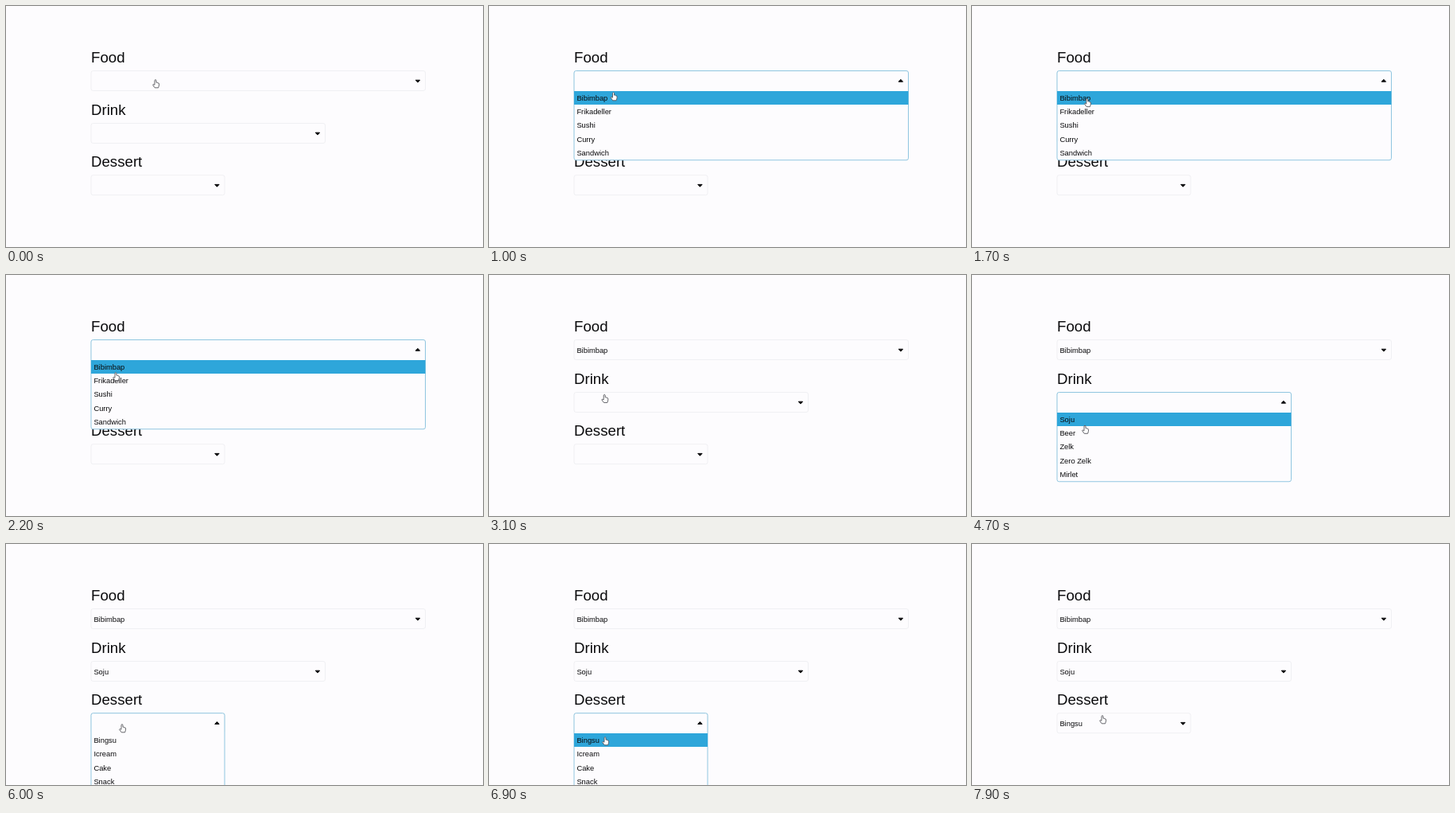
Animation of 600 by 303 pixels, one loop 8 s. Source, as an HTML page with a canvas:

```html
<!DOCTYPE html>
<html lang="en">
<head>
<meta charset="utf-8">
<title>Menu selects</title>
<style>
  html, body { margin: 0; width: 100%; height: 100%; overflow: hidden; background: #fdfcfe; }
  canvas { display: block; }
</style>
</head>
<body>
<canvas id="stage" width="600" height="303"></canvas>
<script>
const ctx = document.getElementById('stage').getContext('2d');
const LOOP = 8000, STEP = 100;
const LEFT = 107, BOX_H = 25, ROW_H = 17.45;
const BG = '#fdfcfe', INK = '#0a0a0c', BLUE = '#2ea6da', FOCUS = '#90c6e0', FAINT = '#f0f0f3';
const FONT = '"Liberation Sans", Arial, sans-serif';

// open / hover / close are times in ms
const selects = [
  { title: 'Food', y: 81.5, width: 420.5, open: 600, hover: 800, close: 2600,
    items: ['Bibimbap', 'Frikadeller', 'Sushi', 'Curry', 'Sandwich'] },
  { title: 'Drink', y: 147.5, width: 294.5, open: 3800, hover: 4000, close: 5000,
    items: ['Soju', 'Beer', 'Zelk', 'Zero Zelk', 'Mirlet'] },
  { title: 'Dessert', y: 212.7, width: 168, open: 6000, hover: 6300, close: 7400,
    items: ['Bingsu', 'Icream', 'Cake', 'Snack', 'Fruit'] }
];

// fingertip position: time, x, y
const path = [
  [0, 188, 92], [600, 188, 92], [1000, 156.5, 108], [1400, 148, 113],
  [2200, 138, 122], [2600, 138, 120], [3300, 147, 157], [3800, 147, 157],
  [4100, 147, 188], [4700, 142, 188.5], [5000, 142, 187], [5500, 146, 215],
  [5600, 146, 230], [5700, 146, 226], [6000, 146, 226], [6400, 146, 242],
  [7700, 146, 242], [7800, 151, 232], [7900, 164, 215]
];

function cursorAt(t) {
  const i = path.findIndex(p => p[0] > t);
  if (i < 0) return path[path.length - 1].slice(1);
  const [t0, x0, y0] = path[i - 1], [t1, x1, y1] = path[i];
  const k = (t - t0) / (t1 - t0), e = k * k * (3 - 2 * k);
  return [x0 + (x1 - x0) * e, y0 + (y1 - y0) * e];
}

function label(text, x, y, size) {
  ctx.font = `${size}px ${FONT}`;
  ctx.fillStyle = INK;
  ctx.fillText(text, x, y);
}

function frame(x, y, w, h, color) {
  ctx.beginPath();
  ctx.roundRect(x, y, w, h, 2.5);
  ctx.fillStyle = BG;
  ctx.fill();
  ctx.strokeStyle = color;
  ctx.lineWidth = 1;
  ctx.stroke();
}

function caret(x, y, dir) {
  ctx.beginPath();
  ctx.moveTo(x - 2.7, y - 1.5 * dir);
  ctx.lineTo(x + 2.7, y - 1.5 * dir);
  ctx.lineTo(x, y + 1.4 * dir);
  ctx.closePath();
  ctx.lineJoin = 'round';
  ctx.lineWidth = 1;
  ctx.fillStyle = ctx.strokeStyle = INK;
  ctx.fill();
  ctx.stroke();
}

function drawClosed(s, t) {
  label(s.title, LEFT, s.y - 10.6, 18.67);
  frame(LEFT, s.y, s.width, BOX_H, FAINT);
  if (t >= s.close) label(s.items[0], 110.4, s.y + 16.1, 9.33);
  caret(LEFT + s.width - 9.6, s.y + 13.2, 1);
}

function drawOpen(s, t) {
  const top = s.y + BOX_H;
  frame(LEFT, s.y, s.width, BOX_H + ROW_H * 5, FOCUS);
  caret(LEFT + s.width - 9.6, s.y + 12.2, -1);
  if (t >= s.hover) {
    ctx.fillStyle = BLUE;
    ctx.fillRect(LEFT, Math.round(top), s.width, 17);
  }
  s.items.forEach((item, i) => label(item, 110.4, top + 12 + i * ROW_H, 9.33));
}

function drawHand(x, y) {
  ctx.save();
  ctx.translate(x, y);
  ctx.beginPath();
  ctx.moveTo(-1, 6.4);
  ctx.lineTo(-1, 1.4);
  ctx.quadraticCurveTo(0, -0.2, 1, 1.4);
  ctx.lineTo(1, 4.2);
  ctx.quadraticCurveTo(2.2, 3.6, 2.8, 4.7);
  ctx.quadraticCurveTo(4.6, 4.6, 4.6, 6.2);
  ctx.lineTo(4.4, 8.2);
  ctx.lineTo(3.6, 10.8);
  ctx.lineTo(-0.8, 10.8);
  ctx.lineTo(-3.4, 7.2);
  ctx.quadraticCurveTo(-3.2, 5.6, -1, 7.2);
  ctx.closePath();
  ctx.fillStyle = '#fff';
  ctx.strokeStyle = '#55555c';
  ctx.lineWidth = 0.9;
  ctx.lineJoin = 'round';
  ctx.fill();
  ctx.stroke();
  ctx.restore();
}

function render(now) {
  const t = Math.floor((now % LOOP) / STEP) * STEP;
  ctx.fillStyle = BG;
  ctx.fillRect(0, 0, 600, 303);
  selects.forEach(s => drawClosed(s, t));
  const active = selects.find(s => t >= s.open && t < s.close);
  if (active) drawOpen(active, t);
  drawHand(...cursorAt(t));
}

const start = performance.now();
function tick() {
  render(performance.now() - start);
  requestAnimationFrame(tick);
}
tick();
</script>
</body>
</html>
```
